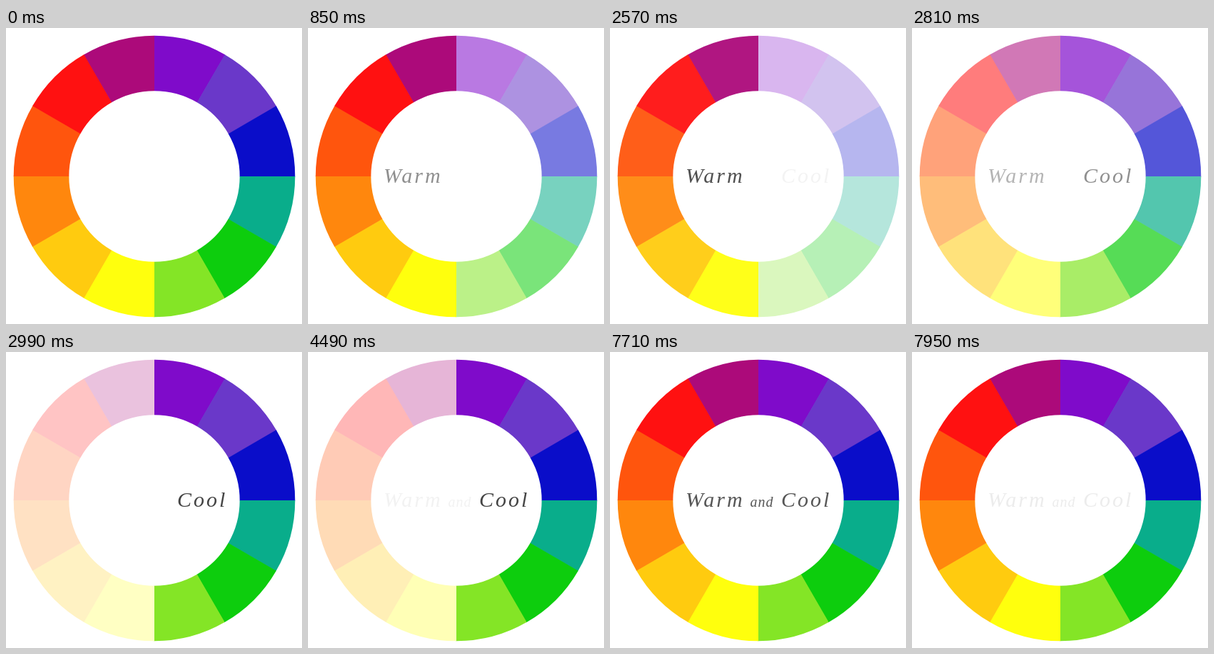
An HTML page with a canvas that plays this animation: 415 px wide and 415 px high, repeating every 8.01 s.

```html
<!DOCTYPE html>
<html lang="en">
<head>
<meta charset="utf-8">
<title>Warm and Cool</title>
<style>
  html, body { margin: 0; height: 100%; overflow: hidden; background: #fff; }
  canvas { display: block; }
</style>
</head>
<body>
<canvas id="stage" width="415" height="415"></canvas>
<script>
const ctx = document.getElementById('stage').getContext('2d');
const LOOP = 8010, STEP = 30;
const CENTER = 208, OUTER = 197.3, INNER = 119.7, FADED = 0.25;

// Clockwise from the top: six cool hues, then six warm ones.
const hues = [
  0x7f0bca, 0x6a38c9, 0x0a0dc9, 0x09ad8b, 0x0dcd0d, 0x84e526,
  0xffff0d, 0xffcb0f, 0xff870d, 0xff550d, 0xff1111, 0xac0a7a
];

// Linear progress in discrete steps; the first step shows at `start`.
function ramp(t, start, steps) {
  const done = Math.floor((t - start) / STEP) + 1;
  return Math.min(1, Math.max(0, done / steps));
}

function tint(hue, strength) {
  const channel = shift => Math.round(255 - (255 - (hue >> shift & 255)) * strength);
  return `rgb(${channel(16)}, ${channel(8)}, ${channel(0)})`;
}

function drawWheel(cool, warm) {
  const slice = Math.PI / 6;
  ctx.lineWidth = OUTER - INNER;
  hues.forEach((hue, i) => {
    const from = i * slice - Math.PI / 2;
    const overlap = i < 11 ? 0.004 : 0; // hides seams under the next slice
    ctx.strokeStyle = tint(hue, i < 6 ? cool : warm);
    ctx.beginPath();
    ctx.arc(CENTER, CENTER, (OUTER + INNER) / 2, from, from + slice + overlap);
    ctx.stroke();
  });
}

function drawWord(text, x, size, spacing, alpha) {
  ctx.globalAlpha = alpha;
  ctx.fillStyle = '#444';
  ctx.font = `italic ${size}px "Liberation Serif", serif`;
  ctx.letterSpacing = spacing + 'px';
  ctx.fillText(text, x, 217);
  ctx.globalAlpha = 1;
}

function draw(t) {
  const toWarm = ramp(t, 700, 10);
  const toCool = ramp(t, 2570, 15);
  const toBoth = ramp(t, 4490, 14);
  const textOut = ramp(t, 7710, 10);
  const strength = shown => FADED + (1 - FADED) * shown;

  ctx.clearRect(0, 0, 415, 415);
  drawWheel(strength(1 - toWarm + toCool), strength(1 - toCool + toBoth));
  drawWord('Warm', 106, 30, 3, toWarm - toCool + toBoth - textOut);
  drawWord('and', 196.5, 20, 1, toBoth - textOut);
  drawWord('Cool', 240, 30, 3, toCool - textOut);
}

function tick() {
  draw(performance.now() % LOOP);
  requestAnimationFrame(tick);
}
tick();
</script>
</body>
</html>
```
